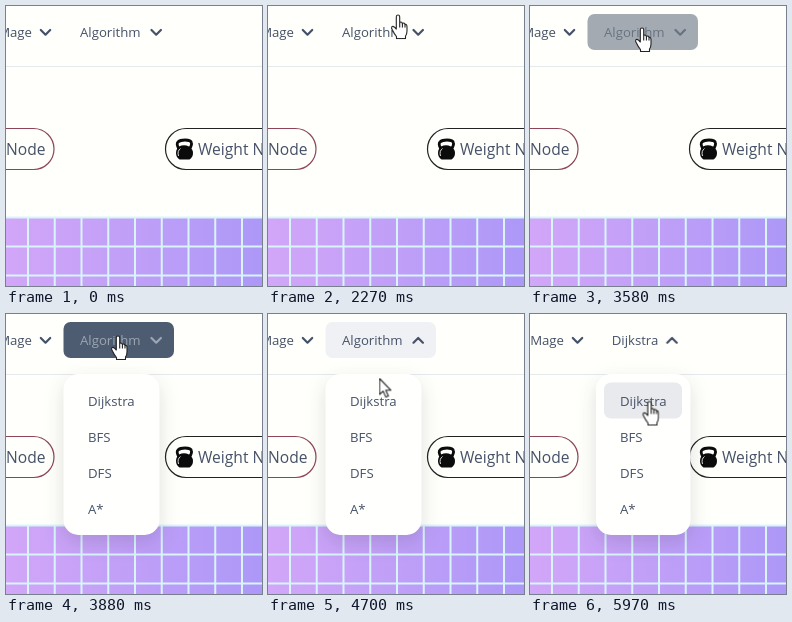
An HTML page that plays this animation: 256x280 px, repeating every 6 s.

```html
<!DOCTYPE html>
<html lang="en">
<head>
<meta charset="utf-8">
<title>Algorithm menu</title>
<style>
  html, body { margin: 0; width: 100%; height: 100%; overflow: hidden; background: #fffffb; }
  svg { display: block; }
  text { font: 13.2px "Open Sans", "Noto Sans", sans-serif; fill: #465268; }
  .big { font-size: 15.6px; }
  .end { text-anchor: end; }
  .chevron { fill: none; stroke: #44516a; stroke-width: 2.2; stroke-linecap: round; stroke-linejoin: round; }
  .pill { fill: #fffffb; stroke-width: 1.2; }
  .lines { stroke: #d8f5fb; stroke-width: 2; fill: none; }
  #menu { transform-origin: 106px 60px; }
  #panel { fill: #fffffd; filter: drop-shadow(0 7px 10px rgba(30, 30, 50, .14)); }
  .cursor { fill: #fff; stroke: #222; stroke-width: 1.1; stroke-linejoin: round; }
</style>
</head>
<body>
<svg width="256" height="280" viewBox="0 0 256 280">
  <defs>
    <linearGradient id="violet">
      <stop offset="0" stop-color="#d2a6f8"/>
      <stop offset="1" stop-color="#ad98f7"/>
    </linearGradient>
  </defs>

  <path d="M0 60.5H256" stroke="#e6eaee"/>
  <rect y="211" width="256" height="69" fill="url(#violet)"/>
  <path id="grid" class="lines"/>

  <rect class="pill" x="-80" y="122.5" width="128" height="41" rx="20.5" stroke="#8d4457"/>
  <text class="big end" x="39.5" y="149">Node</text>
  <rect class="pill" x="159.5" y="122.5" width="160" height="41" rx="20.5" stroke="#222"/>
  <text class="big" x="192" y="149">Weight Node</text>
  <g id="kettlebell">
    <path d="M173 143Q170 138 172 136Q174 134 179 134Q185 134 185.500 137Q186 139 183.500 143" fill="none" stroke="#0b0b0b" stroke-width="2.8"/>
    <path d="M173 140.500Q178 138 183 140.500Q187 143 187 147Q187 151 183.500 153.500H173.500Q170 151 170 147Q170 143 173 140.500Z" fill="#0b0b0b"/>
    <path d="M172.500 150Q171 145 174.500 142.500" fill="none" stroke="#ddd" stroke-width="1"/>
  </g>

  <g id="mage">
    <text class="end" x="26" y="31">Mage</text>
    <path class="chevron" d="M34.800 24L39.500 28.700L44.200 24"/>
  </g>

  <rect id="button" x="57.500" y="8" width="110.500" height="36" rx="7"/>
  <text id="before" x="74" y="31">Algorithm</text>
  <text id="after" x="81.700" y="31">Dijkstra</text>
  <path id="down" class="chevron" d="M145.500 24L150.200 28.700L154.900 24"/>
  <path id="up" class="chevron" d="M145.500 28.700L150.200 24L154.900 28.700"/>

  <g id="menu">
    <rect id="panel" x="57.500" y="60" width="96" height="161" rx="15"/>
    <rect id="item" x="65.500" y="68.500" width="79.500" height="36" rx="7"/>
    <g id="labels"></g>
  </g>

  <g id="pointer">
    <path id="hand" class="cursor" d="M-1.700 11V.8Q-1.700-1 0-1Q1.700-1 1.700.8V7Q2 5.900 3.100 6Q4.400 6.200 4.400 8Q4.800 6.800 5.900 7Q7 7.300 7 9Q7.300 8 8.200 8.500Q9 9 9 10.500V15Q9 18 7.500 20V22.500H-1.500V20.500Q-4 17.500-5.300 14.500Q-7 12-6.300 11Q-5.200 9.600-3.500 11.200L-1.700 13ZM1.700 7V11.500M4.400 8V11.500M7 9V11.500"/>
    <path id="arrow" class="cursor" d="M0 0V16L3.700 12.600L6.300 18.600L8.900 17.500L6.300 11.700H11.300Z"/>
  </g>
</svg>
<script>
const LOOP = 6000, OPEN = 3640, FLIP = 4050, PICK = 5770;
const $ = id => document.getElementById(id);

let grid = 'M0 211.500H256M0 240.500H256M0 269.500H256';
for (let i = 0; i < 9; i++) grid += `M${22 + 26.75 * i} 211V280`;
$('grid').setAttribute('d', grid);

['Dijkstra', 'BFS', 'DFS', 'A*'].forEach((name, i) => {
  const label = document.createElementNS('http://www.w3.org/2000/svg', 'text');
  label.setAttribute('x', 82);
  label.setAttribute('y', 91.5 + 36.2 * i);
  label.textContent = name;
  $('labels').append(label);
});
$('labels').firstChild.id = 'choice';

// steps: [ms, value] pairs; repeating a time makes a hard change
function track(id, prop, steps) {
  const all = [[0, steps[0][1]], ...steps, [LOOP, steps.at(-1)[1]]];
  const frames = all.map(([ms, value]) => ({ offset: ms / LOOP, [prop]: value }));
  $(id).animate(frames, { duration: LOOP, iterations: Infinity });
}
const jump = (id, prop, ms, a, b) => track(id, prop, [[ms, a], [ms, b]]);
const show = (id, ms) => jump(id, 'opacity', ms, 0, 1);
const hide = (id, ms) => jump(id, 'opacity', ms, 1, 0);
const at = (x, y) => `translate(${x}px, ${y}px)`;

const CLEAR = 'rgba(163, 170, 178, 0)', GREY = '#a3aab2', SLATE = '#4e5c71', PALE = '#f0f1f4';
const INK = '#465268', DIM = '#68737f', FAINT = '#9ba5b3';

track('button', 'fill', [
  [2270, CLEAR], [2900, GREY], [3580, GREY], [3860, SLATE], [4080, SLATE],
  [4400, '#a9aeb7'], [4700, PALE], [4900, 'rgba(240, 241, 244, 0)']
]);
const titleInk = [
  [2270, INK], [2900, DIM], [3580, DIM], [3860, FAINT], [4080, FAINT], [4400, DIM], [4700, INK]
];
track('before', 'fill', titleInk);
for (const id of ['down', 'up']) track(id, 'stroke', titleInk);
hide('down', FLIP);
show('up', FLIP);

track('menu', 'opacity', [[OPEN, 0], [OPEN + 200, 1]]);
track('menu', 'transform', [[OPEN, 'scale(.95)'], [OPEN + 200, 'scale(1)']]);
track('item', 'fill', [
  [4930, CLEAR], [5380, GREY], [5520, GREY], [5730, SLATE], [PICK, SLATE], [5960, '#e9eaee']
]);
track('choice', 'fill', [
  [4930, INK], [5380, DIM], [5520, DIM], [5730, FAINT], [PICK, FAINT], [5960, INK]
]);

// the shorter title pulls both neighbours inwards
hide('before', PICK);
show('after', PICK);
for (const id of ['mage', 'labels']) jump(id, 'transform', PICK, at(0, 0), at(8, 0));
jump('up', 'transform', PICK, at(0, 0), at(-8.2, 0));
jump('panel', 'x', PICK, '57.5px', '66px');
jump('panel', 'width', PICK, '96px', '94.5px');
jump('item', 'x', PICK, '65.5px', '74px');
jump('item', 'width', PICK, '79.5px', '78px');

show('pointer', 2270);
track('pointer', 'transform', [
  [2270, at(130, 10)], [2550, at(122, 16)], [2900, at(112, 23)], [4150, at(112, 23)],
  [4450, at(112, 50)], [4700, at(111.5, 64.5)], [4850, at(111.5, 64.5)],
  [5100, at(115, 75)], [5360, at(119.5, 88.5)]
]);
track('arrow', 'opacity', [[4390, 0], [4390, 1], [4930, 1], [4930, 0]]);
track('hand', 'opacity', [[4390, 1], [4390, 0], [4930, 0], [4930, 1]]);
</script>
</body>
</html>
```
